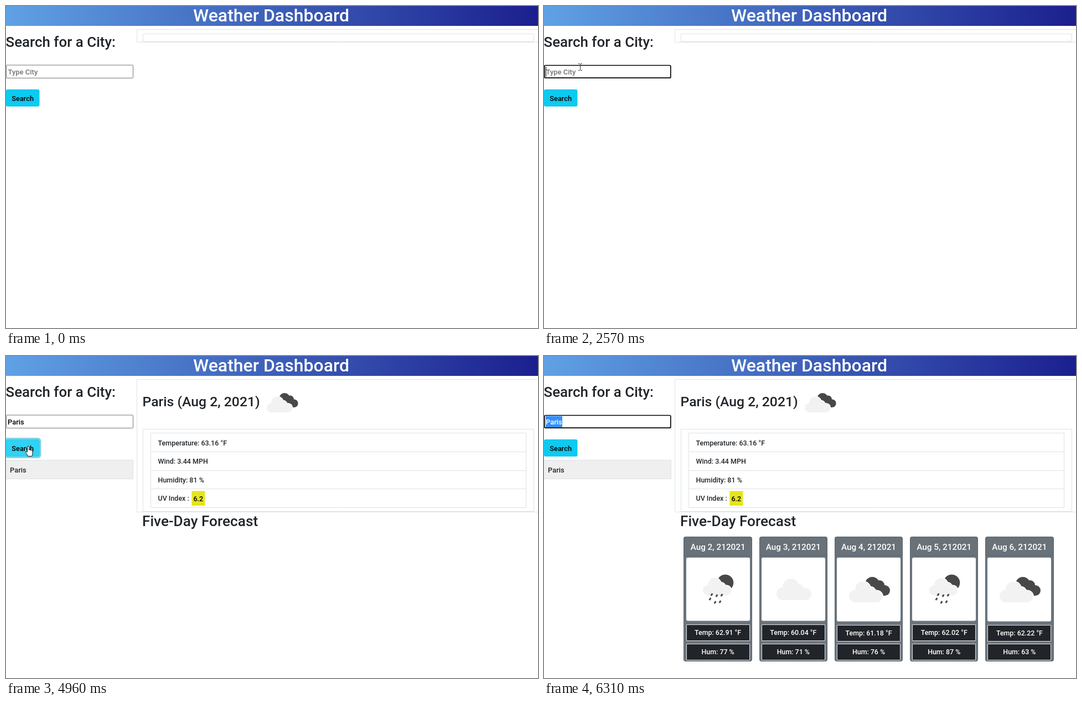
An HTML page with a canvas for the animation above (8 s loop, 961 by 583 pixels).

```html
<!DOCTYPE html>
<html lang="en">
<head>
<meta charset="utf-8">
<title>Weather Dashboard</title>
<style>
html, body { margin: 0; width: 100%; height: 100%; overflow: hidden; background: #fff; }
canvas { display: block; }
</style>
</head>
<body>
<canvas id="stage" width="961" height="583"></canvas>
<script>
const ctx = document.getElementById('stage').getContext('2d');
const LOOP = 8000;
const STEP = 70;
const BORDER = '#dee2e6', INK = '#212529', LIGHT = '#f2f2f2', DARK = '#484848';

// Pointer moves: start time, number of steps, end x, end y
const moves = [
  [210, 9, 64, 99],
  [970, 3, 65, 110],
  [3990, 6, 40, 163],
  [5150, 5, 30, 103],
  [5690, 3, 20, 114]
];
const clicks = [[1510, 1590], [4550, 4620], [6090, 6160], [6240, 6310]];
const keyTimes = [2700, 2900, 3110, 3310, 3510];
const facts = ['Temperature: 63.16 °F', 'Wind: 3.44 MPH', 'Humidity: 81 %', 'UV Index :'];
const days = [
  [2, 'rain', '62.91', 77],
  [3, 'cloud', '60.04', 71],
  [4, 'clouds', '61.18', 76],
  [5, 'rain', '62.02', 87],
  [6, 'clouds', '62.22', 63]
];

const between = (t, a, b) => t >= a && t < b;

function text(s, x, y, size, color = INK, align = 'left') {
  ctx.font = `500 ${size}px Roboto, sans-serif`;
  ctx.textAlign = align;
  ctx.fillStyle = color;
  ctx.fillText(s, x, y);
}

function fillBox(x, y, w, h, color, r = 0) {
  ctx.fillStyle = color;
  ctx.beginPath();
  ctx.roundRect(x, y, w, h, r);
  ctx.fill();
}

function strokeBox(x, y, w, h, color, r = 0, line = 1) {
  ctx.strokeStyle = color;
  ctx.lineWidth = line;
  ctx.beginPath();
  ctx.roundRect(x, y, w, h, r);
  ctx.stroke();
}

function rule(x1, x2, y, color) {
  fillBox(x1, y, x2 - x1, 1, color);
}

function discs(color, ...list) {
  ctx.fillStyle = color;
  for (const [x, y, r] of list) {
    ctx.beginPath();
    ctx.arc(x, y, r, 0, 7);
    ctx.fill();
  }
}

// A 63 x 39 cloud whose top left corner is at x, y
function cloud(x, y, scale = 1, gap = 0) {
  ctx.save();
  ctx.translate(x, y);
  ctx.scale(scale, scale);
  const paint = (color, g) => {
    discs(color, [11.5, 27.5, 11.5 + g], [26, 14.5, 14.5 + g], [40, 20, 10 + g], [52, 28, 11 + g]);
    fillBox(11.5, 20, 40.5, 19 + g, color);
  };
  if (gap) paint('#fff', gap);
  paint(LIGHT, 0);
  ctx.restore();
}

function clouds(x, y, scale = 1) {
  ctx.save();
  ctx.translate(x, y);
  ctx.scale(scale, scale);
  discs(DARK, [42, 13, 13], [55, 15, 9], [64.5, 24.5, 9.5]);
  fillBox(42, 15, 22.5, 19, DARK);
  cloud(0, 8.5, 0.96, 1.5);
  ctx.restore();
}

function rain(x, y) {
  discs(DARK, [x + 40.5, y + 14.5, 14.8]);
  cloud(x, y + 6, 0.81, 1.8);
  ctx.strokeStyle = DARK;
  ctx.lineWidth = 3;
  for (const [dx, dy] of [[16, 36], [25, 38], [34, 37], [13, 44], [22, 50], [31, 49]]) {
    ctx.beginPath();
    ctx.moveTo(x + dx + 1.2, y + dy - 2);
    ctx.lineTo(x + dx - 1.2, y + dy + 2);
    ctx.stroke();
  }
}

function pointer(t) {
  let x = 583, y = 395;
  for (const [start, n, ex, ey] of moves) {
    if (t < start) break;
    const p = Math.min(1, (Math.floor((t - start) / STEP) + 1) / n);
    const e = p * p * (3 - 2 * p);
    x += (ex - x) * e;
    y += (ey - y) * e;
  }
  const kind = x < 230 && y >= 107 && y < 131 ? 'beam'
    : x < 61 && y >= 151 && y < 182 ? 'hand' : 'arrow';
  return { x: Math.round(x), y: Math.round(y), kind };
}

function outline(d, x, y) {
  const path = new Path2D(d);
  ctx.save();
  ctx.translate(x, y);
  ctx.fillStyle = '#fff';
  ctx.strokeStyle = '#111';
  ctx.lineWidth = 1;
  ctx.lineJoin = 'round';
  ctx.fill(path);
  ctx.stroke(path);
  ctx.restore();
}

function drawPointer({ x, y, kind }) {
  if (kind === 'arrow') {
    outline('M.5 .5V13L3.4 10.3L5.5 15.3L7.5 14.4L5.4 9.6H9.3Z', x, y);
  } else if (kind === 'hand') {
    outline('M-1.5 11V1Q0-.8 1.5 1V7Q3 6 4.2 7.5Q5.5 6.8 6.5 8.2Q8 8 8 10V14' +
      'Q8 16 6.5 18.5H-.5Q-1 16-4.2 12.5Q-4.8 10-2.8 10Z', x, y);
  } else {
    ctx.strokeStyle = '#333';
    ctx.lineWidth = 1;
    ctx.stroke(new Path2D(`M${x - 3} ${y - 5.5}h2.5l1 1l1-1h2.5M${x + .5} ${y - 5}v11` +
      `M${x - 3} ${y + 6.5}h2.5l1-1l1 1h2.5`));
  }
}

function drawHeader() {
  const g = ctx.createLinearGradient(0, 0, 961, 0);
  g.addColorStop(0, '#60a1e4');
  g.addColorStop(1, '#1b1f8e');
  ctx.fillStyle = g;
  ctx.fillRect(0, 0, 961, 36);
  text('Weather Dashboard', 479, 28, 32, '#fff', 'center');
}

function drawInput(t, hover) {
  const focus = between(t, 1510, 4550) || t >= 6090;
  const typed = 'Paris'.slice(0, keyTimes.filter(k => t >= k).length);
  const selected = t >= 6240;
  if (focus) strokeBox(.8, 107.5, 228, 22.7, '#000', 2, 1.7);
  else strokeBox(.5, 107, 229, 23.5, hover ? '#5a5a5a' : '#767676', 1);

  if (selected) fillBox(3, 109, 30, 20, '#3390ff');
  if (typed) text(typed, 3, 124, 12.9, selected ? '#fff' : '#000');
  else text('Type City', 3.5, 124, 13, '#757575');

  if (focus && !selected) {
    const since = [1510, ...keyTimes, 6090].filter(k => k <= t).pop();
    const x = t >= 6090 ? 20 : typed ? 3 + Math.round(ctx.measureText(typed).width) : 3;
    if (Math.floor((t - since) / 530) % 2 === 0) fillBox(x, 110, 1, 18, '#000');
  }
}

function drawButton(t, hover) {
  const ring = between(t, 4550, 6090) ? Math.min(1, (t - 4530) / 150) * 3 : 0;
  if (ring) fillBox(-ring, 151 - ring, 60.5 + 2 * ring, 31 + 2 * ring, '#82d4e6', 3 + ring);
  fillBox(0, 151, 60.5, 31, hover ? '#31d2f2' : '#0dcaf0', 3);
  if (hover) strokeBox(.5, 151.5, 59.5, 30, '#25cff2', 3);
  text('Search', 30.2, 171.6, 12.8, '#000', 'center');
}

function drawToday(t) {
  const open = t >= 4830;
  strokeBox(236.5, 42.5, 730, open ? 240 : 23, BORDER);
  strokeBox(247.5, open ? 132.5 : 50.5, 706, open ? 149 : 14, BORDER);
  if (t >= 4760) text('Paris (Aug 2, 2021)', 246.5, 91, 24.7);
  if (!open) return;

  clouds(471, 67, 0.765);
  strokeBox(261.5, 139.5, 678, 135, BORDER);
  facts.forEach((s, i) => {
    if (i) rule(262, 939, [173, 207, 240][i - 1], BORDER);
    text(s, 274.5, 161.6 + i * 33.6, 12.5);
  });
  fillBox(335.4, 244.4, 24, 26.5, '#e5e51b');
  text('6.2', 347.3, 262.5, 12.5, '#000', 'center');
  text('Five-Day Forecast', 246, 307.5, 26.2);

  fillBox(0, 188, 230, 35, '#efefef');
  strokeBox(-.5, 188.5, 230, 34, BORDER);
  text('Paris', 7, 211, 12.9);
}

function drawCards() {
  days.forEach(([day, icon, temp, hum], i) => {
    const left = 252.4 + i * 136.2;
    const x = Math.round(left), w = Math.round(left + 123.4) - x;
    const inX = Math.round(left + 4.3), inW = Math.round(left + 119.1) - inX;
    const mid = left + 61.7;
    const low = icon === 'clouds' ? 1 : 0;
    fillBox(x, 327, w, 226, '#6c757d', 4);
    fillBox(x, 327, w, 34, 'rgba(0,0,0,.03)', [4, 4, 0, 0]);
    rule(x, x + w, 361, 'rgba(0,0,0,.125)');
    strokeBox(x + .5, 327.5, w - 1, 225, 'rgba(0,0,0,.125)', 4);
    text(`Aug ${day}, 212021`, mid, 350.5, 15.3, '#fff', 'center');

    fillBox(inX, 365, inW, 114.5 + low, '#fff', 3);
    if (icon === 'rain') rain(x + 35, 396);
    else if (icon === 'cloud') cloud(x + 31, 403);
    else clouds(x + 26, 400);

    [[`Temp: ${temp} °F`, 486 + low], [`Hum: ${hum} %`, 521]].forEach(([s, y]) => {
      fillBox(inX, y, inW, 30, INK);
      strokeBox(inX + .5, y + .5, inW - 1, 29, BORDER);
      text(s, mid, y + 19.4, 12.4, '#fff', 'center');
    });
  });
}

function draw(t) {
  const p = pointer(t);
  const shown = between(t, 70, 6310);
  ctx.fillStyle = '#fff';
  ctx.fillRect(0, 0, 961, 583);
  drawHeader();
  text('Search for a City:', -.5, 74, 25.9);
  drawToday(t);
  drawInput(t, shown && p.kind === 'beam');
  drawButton(t, shown && p.kind === 'hand');
  if (t >= 5090) drawCards();
  if (clicks.some(([a, b]) => between(t, a, b))) discs('rgba(170,222,70,.8)', [p.x, p.y, 10]);
  if (shown) drawPointer(p);
}

const begin = performance.now();
function tick() {
  draw((performance.now() - begin) % LOOP);
  requestAnimationFrame(tick);
}
tick();
</script>
</body>
</html>
```
